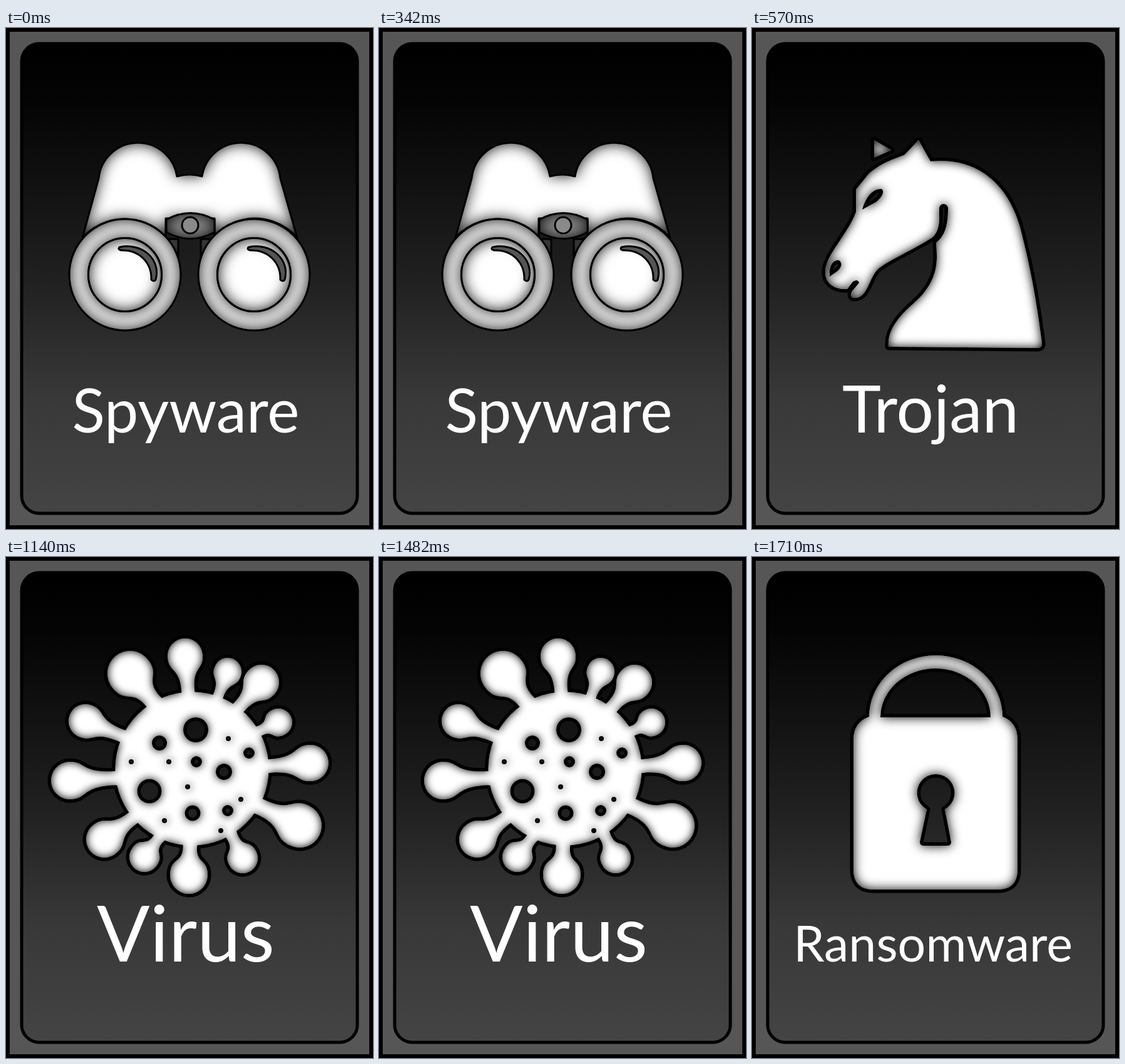
An HTML page that plays this animation: 586x800 px, repeating every 2.28 s.

```html
<!DOCTYPE html>
<html lang="en">
<head>
<meta charset="utf-8">
<title>Malware cards</title>
<style>
  html, body { margin: 0; width: 100%; height: 100%; overflow: hidden; background: #000; }
  svg { display: block; width: 586px; height: 800px; }
  text { font-family: Lato, "Open Sans", sans-serif; fill: #fff; text-anchor: middle; }
  .edge { fill: none; stroke: #000; stroke-width: 11; stroke-linejoin: round; }
  .line { stroke: #000; stroke-width: 3; stroke-linejoin: round; }
</style>
</head>
<body>
<svg id="stage" viewBox="0 0 586 800"></svg>
<script>
const stage = document.getElementById('stage');
const HOLD = 570;

// Darkens a shape from its edge inwards
const shade = blur => `
  <filter id="shade${blur}" filterUnits="userSpaceOnUse" x="0" y="0" width="586" height="800" color-interpolation-filters="sRGB">
    <feGaussianBlur in="SourceAlpha" stdDeviation="${blur}"/>
    <feComponentTransfer result="rim"><feFuncA type="linear" slope="-1" intercept="1"/></feComponentTransfer>
    <feComposite in="rim" in2="SourceAlpha" operator="in" result="rim"/>
    <feMerge><feMergeNode in="SourceGraphic"/><feMergeNode in="rim"/></feMerge>
  </filter>`;

const path = (d, attrs = '') => `<path d="${d}" fill-rule="evenodd" ${attrs}/>`;
const ring = (x, y, r) => `M${x - r} ${y}a${r} ${r} 0 1 1 ${2 * r} 0a${r} ${r} 0 1 1 ${-2 * r} 0z`;
const outlined = (art, blur) => `<g class="edge">${art}</g><g fill="#fff" filter="url(#shade${blur})">${art}</g>`;
const lined = (d, fill = '#fff', blur = 12) =>
  path(d, `fill="${fill}" filter="url(#shade${blur})"`) + path(d, 'class="line" fill="none"');

function binoculars() {
  const body = `M122 335L148 240A63 63 0 0 1 273 237Q293 231 313 237A63 63 0 0 1 438 240L465 335
    A90 90 0 0 0 311 368V337H333V304H255V337H275V368A90 90 0 0 0 122 335Z`;
  const glint = 'M181 350C218 342 248 370 239 402Q236 406 232 402C233 375 213 354 184 355Q178 354 181 350Z';
  const eye = x => lined(ring(x, 394, 89) + ring(x, 394, 58.5), '#f4f4f4')
    + lined(ring(x, 394, 58.5))
    + path(glint, `class="line" fill="#555" transform="translate(${x - 190})"`);
  return lined(body) + eye(190) + eye(396)
    + lined('M256 306Q294 285 333 306V326Q294 347 256 326Z', '#8c8c8c')
    + path(ring(294, 315, 13), 'class="line" fill="#8a8a8a"');
}

function horse() {
  const head = `M266 179L285 213C365 205 410 255 428 318C448 395 456 450 463 503Q464 511 455 511L218 509
    C215 470 255 445 272 426C298 395 296 370 294 343C308 332 313 315 313 289A7 7 0 0 0 299 287V300
    C300 320 293 331 287 335C262 352 215 372 200 386C186 402 184 432 163 431Q155 430 160 420L171 407
    Q169 400 161 405L152 417C135 418 118 410 117 392C116 375 130 355 140 340C150 325 160 310 166 294V258
    L187 232C205 218 215 213 243 203Z`;
  const eye = 'M176 290C180 275 190 256 207 257C213 262 206 272 198 278Z';
  const nostril = 'M124 397C122 380 130 369 139 371C147 377 140 386 134 390Z';
  return outlined(path('M195 179L222 195L195 207Z') + path(head + eye + nostril), 8);
}

function virus() {
  // base x, y, bulb x, y, radius
  const spikes = [
    [291, 217, 286, 158, 28], [338, 224, 354, 183, 22], [371, 241, 408, 200, 28],
    [404, 278, 435, 264, 22], [418, 334, 486, 329, 29], [404, 398, 469, 429, 35],
    [361, 446, 378, 481, 24], [294, 460, 292, 508, 30], [244, 449, 221, 479, 24],
    [205, 415, 157, 451, 29], [176, 353, 102, 357, 30], [186, 286, 127, 262, 27],
    [236, 232, 198, 186, 36]];
  const pits = [
    [303, 276, 20], [229, 374, 19.5], [348, 343, 13], [298, 409, 12.5], [245, 297, 12],
    [304, 327, 9], [388, 313, 9], [354, 405, 9], [355, 290, 4], [200, 327, 4],
    [260, 327, 4], [290, 367, 4], [375, 387, 4], [253, 421, 4], [343, 437, 4]];
  const spike = ([x, y, bx, by, r]) => {
    const len = Math.hypot(bx - x, by - y), h = r * .37;
    const turn = Math.atan2(by - y, bx - x) * 180 / Math.PI;
    return path(`M-12 ${-h - 3}Q-2 ${-h} 4 ${-h}C${len - r * .6} ${-h} ${len - r * .9} ${-r} ${len} ${-r}
      A${r} ${r} 0 0 1 ${len} ${r}C${len - r * .9} ${r} ${len - r * .6} ${h} 4 ${h}Q-2 ${h} -12 ${h + 3}Z`,
      `transform="translate(${x} ${y})rotate(${turn})"`);
  };
  const body = ring(297, 338, 122.5) + pits.map(p => ring(...p)).join('');
  return outlined(spikes.map(spike).join('') + path(body), 7);
}

function padlock() {
  const body = `M187 255A106.5 98 0 0 1 400 255Q424 264 424 292V499Q424 531 392 531H194Q162 531 162 499V292
    Q162 264 187 255Z`;
  const gap = 'M205 256A88 78 0 0 1 381 256Z';
  const keyhole = 'M279 403A30 30 0 1 1 308 403L318 455Q318 461 312 461H274Q268 461 268 455Z';
  return outlined(path(body + gap + keyhole), 9);
}

const cards = [
  ['Spyware', 97, 287, binoculars()],
  ['Trojan', 105, 285, horse()],
  ['Virus', 125, 287, virus()],
  ['Ransomware', 79, 289, padlock()]];

stage.innerHTML = `
  <defs>
    ${[7, 8, 9, 12].map(shade).join('')}
    <linearGradient id="night" x2="0" y2="1">
      <stop stop-color="#000"/><stop offset=".12" stop-color="#040404"/>
      <stop offset=".5" stop-color="#202020"/><stop offset=".75" stop-color="#383838"/>
      <stop offset="1" stop-color="#444"/>
    </linearGradient>
  </defs>
  <path d="M6 6H580V794H6Z" fill="#565656"/>
  <rect x="25" y="25" width="536" height="750" rx="28" fill="url(#night)" stroke="#000" stroke-width="5"/>
  ${cards.map(([name, size, x, art]) =>
    `<g class="card">${art}<text x="${x}" y="646" font-size="${size}">${name}</text></g>`).join('')}`;

const layers = [...stage.querySelectorAll('.card')];
function draw(now) {
  const current = Math.floor(now / HOLD) % layers.length;
  layers.forEach((layer, i) => layer.style.display = i === current ? '' : 'none');
  requestAnimationFrame(draw);
}
draw(performance.now());
</script>
</body>
</html>
```
